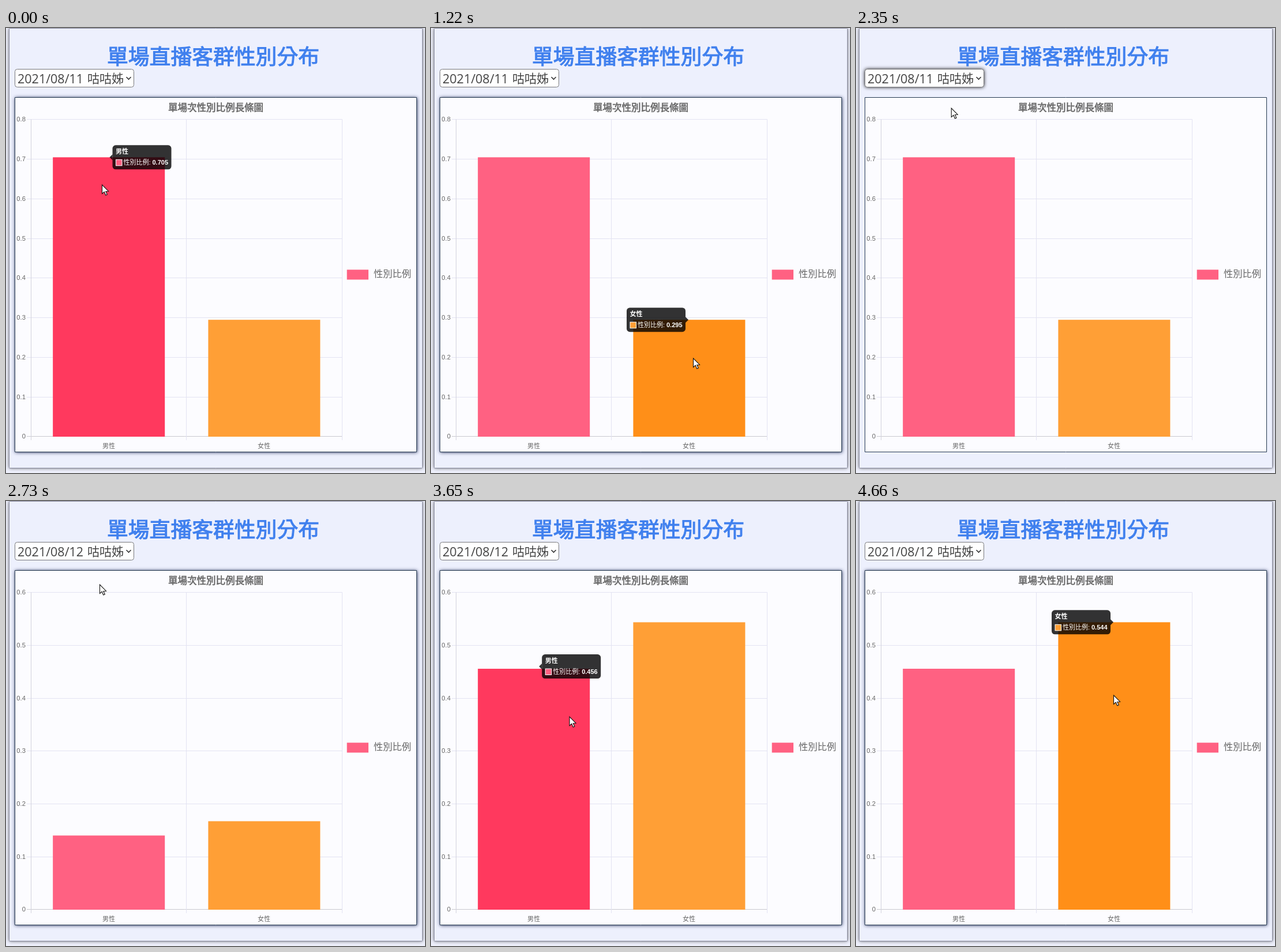
Write an HTML page with a canvas that moves like this. It is 726 px wide and 772 px high and loops after 4700 ms.

```html
<!DOCTYPE html>
<html lang="zh-Hant">
<head>
<meta charset="utf-8">
<title>單場直播客群性別分布</title>
<style>
  html, body { margin: 0; width: 100%; height: 100%; overflow: hidden; background: #edf0fd; }
  canvas { display: block; width: 726px; height: 772px; }
</style>
</head>
<body>
<canvas id="stage" width="726" height="772"></canvas>
<script>
const ctx = document.getElementById('stage').getContext('2d');
const LOOP = 4700;
const CJK = '"Noto Sans CJK TC", "Noto Sans CJK JP", sans-serif';
const ARIAL = '"Liberation Sans", Arial, ' + CJK;
const SEGOE = '"Open Sans", "Noto Sans", sans-serif';
const HOST = '咕咕姊';

const PLOT = { left: 43.5, mid: 312.5, right: 582.5, top: 158.5, bottom: 708.5 };
const BARS = [
  { label: '男性', x: 81.2, center: 178, color: [255, 97, 130], hover: [255, 57, 94] },
  { label: '女性', x: 350.4, center: 447, color: [255, 159, 54], hover: [255, 143, 24] }
];
const BAR_WIDTH = 194;
const SWAP = 2631, GROW = 1138;
const SESSIONS = [
  { date: '2021/08/11', max: 0.8, values: [0.705, 0.295] },
  { date: '2021/08/12', max: 0.6, values: [0.456, 0.544] }
];

// Times at which the pointer rests on a bar
const HOVERS = [
  { bar: 0, from: -1000, to: 570 },
  { bar: 1, from: 800, to: 1390 },
  { bar: 0, from: 3440, to: 4100 },
  { bar: 1, from: 4170, to: 9000 }
];

// Pointer path: time, x, y
const PATH = [
  [0, 167, 272], [130, 167, 272], [1150, 455, 573], [1250, 455, 573],
  [1740, 185, 97], [2000, 185, 97], [2450, 163, 145], [2740, 163, 145],
  [3380, 238, 375], [4050, 245, 373], [4150, 360, 356], [4400, 447, 337], [4700, 447, 337]
];

const clamp = v => Math.max(0, Math.min(1, v));
const ramp = (t, start, length) => clamp((t - start) / length);
const outQuart = p => 1 - (1 - p) ** 4;
const mix = (a, b, p) => a + (b - a) * p;
const rgb = c => `rgb(${c.map(Math.round)})`;
const mixColor = (a, b, p) => rgb(a.map((v, i) => mix(v, b[i], p)));

function text(str, x, cy, size, color, { font = CJK, weight = 400, align = 'left', embolden = 0 } = {}) {
  const baseline = cy + size * 0.37;
  ctx.font = `${weight} ${size}px ${font}`;
  ctx.textAlign = align;
  ctx.fillStyle = ctx.strokeStyle = color;
  ctx.fillText(str, x, baseline);
  if (embolden) {
    ctx.lineWidth = embolden;
    ctx.strokeText(str, x, baseline);
  }
}

function line(x1, y1, x2, y2, color) {
  ctx.strokeStyle = color;
  ctx.lineWidth = 1;
  ctx.beginPath();
  ctx.moveTo(x1, y1);
  ctx.lineTo(x2, y2);
  ctx.stroke();
}

function box(x, y, w, h, radius, fill, stroke, shadow, blur) {
  ctx.save();
  ctx.beginPath();
  ctx.roundRect(x, y, w, h, radius);
  ctx.fillStyle = fill;
  ctx.shadowColor = shadow;
  ctx.shadowBlur = blur;
  ctx.fill();
  ctx.shadowColor = 'transparent';
  ctx.lineWidth = 1;
  ctx.strokeStyle = stroke;
  ctx.stroke();
  ctx.restore();
}

function pointerAt(t) {
  const i = PATH.findIndex((p, k) => k > 0 && t <= p[0]);
  const [t0, x0, y0] = PATH[i - 1], [t1, x1, y1] = PATH[i];
  const p = ramp(t, t0, t1 - t0), s = p * p * (3 - 2 * p);
  return [mix(x0, x1, s), mix(y0, y1, s)];
}

function drawPage(panelGlow) {
  ctx.fillStyle = '#eff1fd';
  ctx.fillRect(0, 0, 726, 772);
  box(5.5, 0.5, 716, 763, 1, '#edf0fd', '#85879a', 'rgba(0,0,0,.6)', 6);
  text('單場直播客群性別分布', 359, 49, 36.8, '#4080ee', { align: 'center', embolden: 1.1 });
  box(15.5, 120.5, 696, 615, 0, '#fcfcff', '#24384f', `rgba(18,28,72,${panelGlow})`, 6);
}

function drawSelect(date, glow) {
  box(15.5, 71.5, 206, 31, 4, '#fff', '#77777a', `rgba(0,0,0,${glow})`, 6);
  text(date, 20, 88, 21.5, '#444', { font: SEGOE });
  text(HOST, 141, 87, 21, '#444', { weight: 300 });
  ctx.strokeStyle = '#333';
  ctx.lineWidth = 1.6;
  ctx.beginPath();
  ctx.moveTo(208.5, 85);
  ctx.lineTo(212.5, 89);
  ctx.lineTo(216.5, 85);
  ctx.stroke();
}

function drawAxes(max) {
  const { left, mid, right, top, bottom } = PLOT;
  const steps = Math.round(max * 10);
  text('單場次性別比例長條圖', 363.5, 138, 16.5, '#666', { align: 'center', embolden: 0.6 });
  for (let i = 0; i <= steps; i++) {
    const y = Math.floor(mix(bottom, top, i / steps) + 0.25) + 0.5;
    line(36, y, right, y, i ? '#e3e3f2' : '#c9c9cf');
    text(i ? (i / 10).toFixed(1) : '0', 34, y - 0.5, 11.3, '#666', { font: ARIAL, align: 'right' });
  }
  [left, mid, right].forEach((x, i) => line(x, top, x, 715, i ? '#e3e3f2' : '#d3d3dc'));
  BARS.forEach(b => text(b.label, b.center, 724.5, 11, '#666', { align: 'center' }));
  ctx.fillStyle = rgb(BARS[0].color);
  ctx.fillRect(590.7, 419.3, 37.3, 17.2);
  text('性別比例', 637, 426, 16.3, '#666', { weight: 300 });
}

const hoverAmount = (t, bar) => HOVERS
  .filter(h => h.bar === bar)
  .reduce((most, h) => Math.max(most,
    outQuart(ramp(t, h.from, 300)) * (1 - outQuart(ramp(t, h.to, 400)))), 0);

function drawTooltip(t, values, tops) {
  const current = HOVERS.findLastIndex(h => t >= h.from);
  const opacity = clamp(HOVERS.reduce((sum, h) =>
    sum + ramp(t, h.from, 200) * (1 - ramp(t, h.to, 200)), 0));
  if (opacity <= 0) return;

  const { bar, from } = HOVERS[current];
  const place = i => [i ? 339 : 184.5, tops[i] - 21];
  const previous = current ? HOVERS[current - 1].bar : bar;
  const glide = outQuart(ramp(t, from, 400));
  const [x0, y0] = place(previous), [x1, y1] = place(bar);
  const x = mix(x0, x1, glide), y = mix(y0, y1, glide);
  const edge = bar ? x + 102 : x, tip = bar ? edge + 5 : edge - 5;

  ctx.save();
  ctx.globalAlpha = opacity;
  ctx.fillStyle = 'rgba(0,0,0,.8)';
  ctx.beginPath();
  ctx.roundRect(x, y, 102, 42, 5.5);
  ctx.fill();
  ctx.beginPath();
  ctx.moveTo(edge, y + 16);
  ctx.lineTo(tip, y + 21);
  ctx.lineTo(edge, y + 26);
  ctx.fill();

  text(BARS[bar].label, x + 5.5, y + 11, 11, '#fff', { weight: 700 });
  ctx.fillRect(x + 5.5, y + 24.5, 11.5, 11.5);
  ctx.fillStyle = rgb(BARS[bar].color);
  ctx.fillRect(x + 6.5, y + 25.5, 9.5, 9.5);
  text('性別比例:', x + 19, y + 30, 11, '#fff', { font: ARIAL, weight: 500 });
  text(values[bar].toFixed(3), x + 96.5, y + 30, 11, '#fff', { font: ARIAL, weight: 700, align: 'right' });
  ctx.restore();
}

function drawPointer(x, y) {
  const outline = [[0, 0], [0, 15.5], [3.7, 12.2], [6.2, 18], [8.8, 16.9], [6.3, 11.4], [11, 11.2]];
  ctx.beginPath();
  outline.forEach(([dx, dy]) => ctx.lineTo(x + dx - 0.5, y + dy));
  ctx.closePath();
  ctx.fillStyle = '#fff';
  ctx.fill();
  ctx.strokeStyle = '#111';
  ctx.lineWidth = 1.1;
  ctx.stroke();
}

function draw(t) {
  const swapped = t >= SWAP;
  const { date, max, values } = SESSIONS[swapped ? 1 : 0];
  const growth = swapped ? outQuart(ramp(t, SWAP, GROW)) : 1;
  const base = PLOT.bottom + 0.5;
  const tops = values.map(v => base - v * growth / max * 550);
  const selectGlow = ramp(t, 1700, 80) * (1 - ramp(t, 2600, 100));

  drawPage(1 - selectGlow);
  drawSelect(date, selectGlow);
  drawAxes(max);
  BARS.forEach((b, i) => {
    ctx.fillStyle = mixColor(b.color, b.hover, hoverAmount(t, i));
    ctx.fillRect(b.x, tops[i], BAR_WIDTH, base - tops[i]);
  });
  drawTooltip(t, values, tops);
  drawPointer(...pointerAt(t));
}

const start = performance.now();
function tick() {
  draw((performance.now() - start) % LOOP);
  requestAnimationFrame(tick);
}
tick();
</script>
</body>
</html>
```
